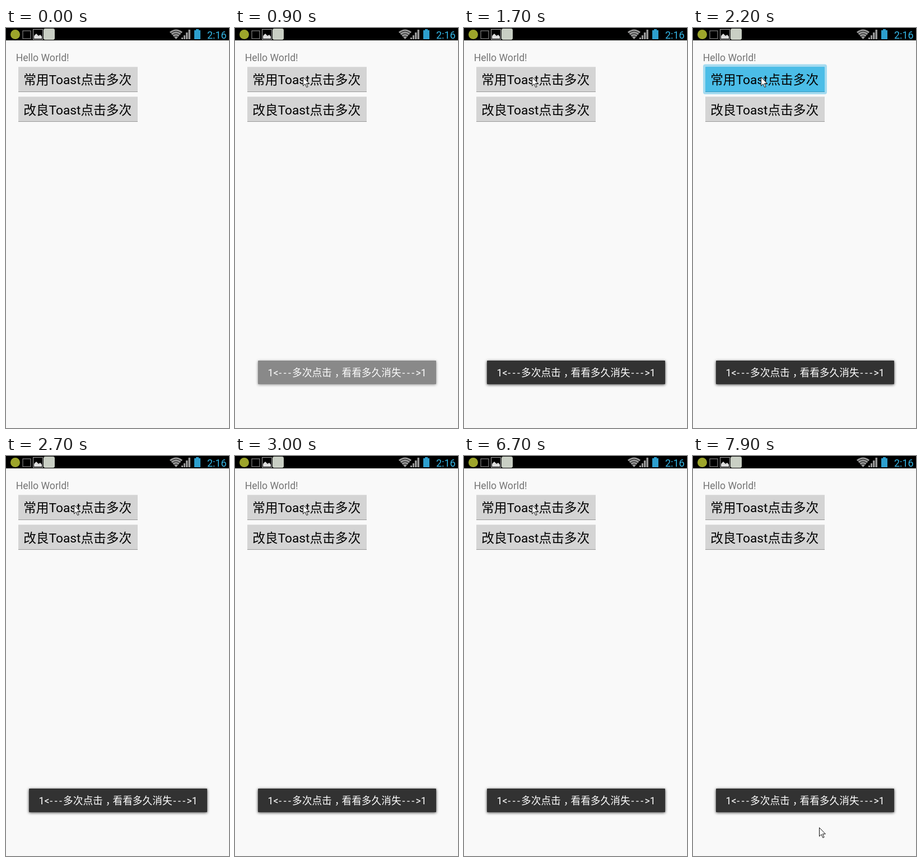
Recreate the animation shown at these times as an HTML page. Size 398 by 712 pixels, loop 8 s.

```html
<!DOCTYPE html>
<html lang="zh-CN">
<head>
<meta charset="utf-8">
<title>Toast</title>
<style>
  html, body { margin: 0; width: 100%; height: 100%; overflow: hidden; background: #f9f9f9; }
  svg { display: block; font-family: Roboto, "Noto Sans CJK SC", "Noto Sans CJK", sans-serif; }
  .label { font-size: 22.7px; }
  .dashes { letter-spacing: 3.5px; }
  #toast rect { filter: drop-shadow(0 1px 2.5px rgba(0, 0, 0, .75)); }
</style>
</head>
<body>
<svg width="398" height="712" viewBox="0 0 398 712">
  <defs>
    <g id="plate">
      <rect x="22" y="69" width="213" height="45" rx="1" fill="#d4d4d4"/>
      <path d="M22 69.5h213" stroke="#dedede"/>
      <path d="M22 113.5h213" stroke="#999"/>
    </g>
  </defs>
  <rect width="398" height="712" fill="#f9f9f9"/>
  <rect y="22" width="398" height="3" fill="#f5f6f5"/>

  <!-- status bar -->
  <rect width="398" height="22"/>
  <circle cx="16.5" cy="11.5" r="8.5" fill="#9da52b"/>
  <rect x="30" y="5" width="14" height="14" fill="none" stroke="#999"/>
  <rect x="48.5" y="2.5" width="17" height="18" fill="none" stroke="#aaa"/>
  <path d="M50 19v-5l4-4 4 4 3-2 3 3v4z" fill="#ddd"/>
  <rect x="67" y="1" width="20" height="20" rx="3" fill="#c9cfc4"/>
  <path d="M303.5 20L292 7Q303.5-2 315 7z" fill="#999"/>
  <path d="M293 10.5Q303.5 1 314 10.5M296 13.5Q303.5 6.5 311 13.5M299 16.5Q303.5 12 308 16.5" fill="none" stroke="#000"/>
  <path d="M313 20v-3h3v3zM317 20v-7h3v7zM321 20V8h3.500v12zM325.500 20V3h3.500v17z" fill="#999"/>
  <path d="M336 4h3V2h5v2h3v16h-11z" fill="#2d9fce"/>
  <text x="359" y="19" font-size="18" fill="#33b5e5">2:16</text>

  <text x="17.7" y="59" font-size="17.6" fill="#757575">Hello World!</text>
  <use href="#plate"/>
  <use href="#plate" y="53"/>
  <g id="pressed">
    <rect x="18" y="64.5" width="221" height="53.5" rx="4" fill="#a5dbf0"/>
    <rect x="22" y="69" width="213" height="45" rx="1" fill="#4bbde7"/>
    <path d="M22 113.5h213" stroke="#3a9cc2"/>
  </g>
  <text class="label" x="31.2" y="100">常用Toast点击多次</text>
  <text class="label" x="31.2" y="154">改良Toast点击多次</text>

  <g id="toast">
    <rect x="41" y="592" width="318" height="42" rx="1" fill="#323232"/>
    <g fill="#fff" font-size="17.7">
      <text x="58.5" y="619.5">1&lt;</text>
      <text class="dashes" x="78.3" y="619.5">---</text>
      <text x="102" y="619.5">多次点击<tspan dx="5">，</tspan><tspan dx="-5">看看多久消失</tspan></text>
      <text class="dashes" x="298.5" y="619.5">---</text>
      <text x="322.5" y="619.5">&gt;1</text>
    </g>
  </g>

  <path id="cursor" d="M.5 .5v15.5l3.600-3.400 2.700 5.900 2.300-1-2.700-5.700h5z" fill="#fff" stroke="#111"/>
</svg>
<script>
const LOOP = 8000, STEP = 100;
const clicks = [800, 1600, 2200, 2600];
// cursor waypoints: time, x, y
const path = [
  [200, 332, 46], [400, 146, 82], [500, 121, 87], [6900, 121, 87], [7100, 108, 115], [7300, 158, 212],
  [7500, 184, 288], [7600, 175, 364], [7700, 162, 508], [7800, 185, 614], [7900, 225, 661]
];
const [pressed, toast, cursor] = ["pressed", "toast", "cursor"].map(id => document.getElementById(id));
const mix = (a, b, u) => a + (b - a) * u;
const clamp = u => Math.min(1, Math.max(0, u));
const show = (el, on) => el.setAttribute("visibility", on ? "visible" : "hidden");

function cursorAt(t) {
  const next = Math.max(1, path.findIndex(point => point[0] >= t));
  const [t0, x0, y0] = path[next - 1], [t1, x1, y1] = path[next];
  const u = clamp((t - t0) / (t1 - t0));
  return [mix(x0, x1, u), mix(y0, y1, u)];
}

function draw(now) {
  const t = Math.floor(now % LOOP / STEP) * STEP;
  show(pressed, clicks.includes(t));
  show(toast, t >= 900);
  toast.setAttribute("opacity", 1 - (1 - clamp((t - 750) / 450)) ** 2);
  show(cursor, t >= 200);
  cursor.setAttribute("transform", `translate(${cursorAt(t).map(Math.round)})`);
}

const start = performance.now();
function tick() {
  draw(performance.now() - start);
  requestAnimationFrame(tick);
}
tick();
</script>
</body>
</html>
```
